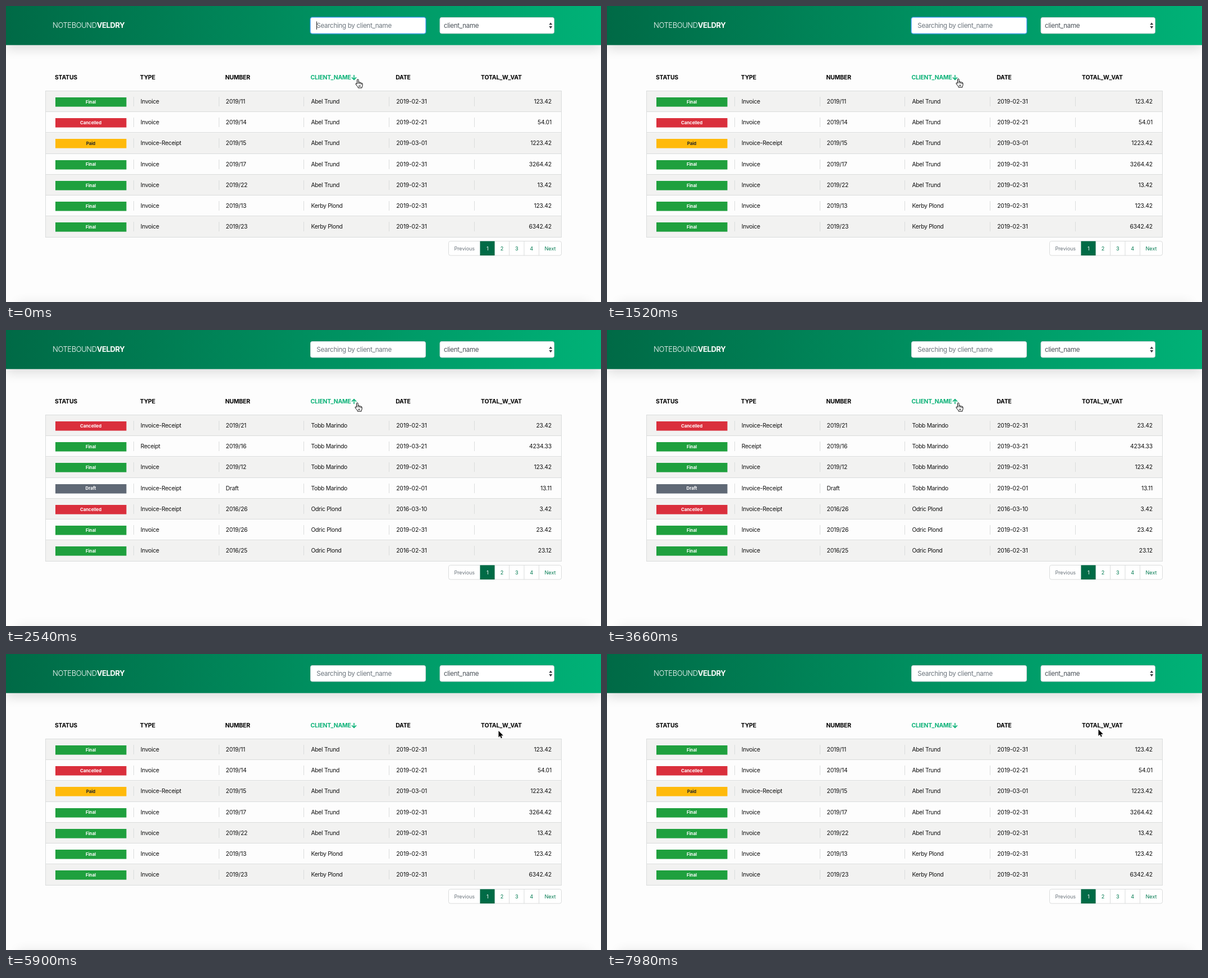
An HTML page for the animation above (8 s loop, 1060 px wide and 528 px high).

```html
<!DOCTYPE html>
<html lang="en">
<head>
<meta charset="utf-8">
<title>Document list</title>
<style>
  html, body { margin: 0; width: 100%; height: 100%; overflow: hidden; background: #fdfdfd; }
  svg { display: block; width: 1060px; height: 528px; }
  text { font: 10.4px Inter, "Open Sans", sans-serif; letter-spacing: -.3px; fill: #111; white-space: pre; }
  .logo { font-size: 13px; font-weight: 300; letter-spacing: -.4px; fill: #fff; }
  .logo tspan { font-weight: 700; }
  .field { font-size: 11.6px; fill: #495057; }
  .hint { fill: #6c757d; }
  .head { font-weight: 700; letter-spacing: -.15px; fill: #000; }
  .badge { font-size: 7.8px; font-weight: 700; letter-spacing: 0; text-anchor: middle; }
  .page { font-size: 9.1px; letter-spacing: -.05px; text-anchor: middle; }
  .num { letter-spacing: -.2px; }
  .end { text-anchor: end; }
</style>
</head>
<body>
<svg id="stage" viewBox="0 0 1060 528"></svg>
<script>
const LOOP = 8000, SORT_UP = 2500, SORT_DOWN = 3820;
const GREEN = '#006b46', ACCENT = '#0bb277', LINE = '#dadcdc';
const HEADS = ['STATUS', 'TYPE', 'NUMBER', 'CLIENT_NAME', 'DATE', 'TOTAL_W_VAT'];
const BADGES = {
  Final: ['#1fa03e', '#fff'], Cancelled: ['#da2f3c', '#fff'],
  Paid: ['#ffba0b', '#212529'], Draft: ['#5f6875', '#fff']
};
const DOWN = `Final|Invoice|2019/11|Abel Trund|2019-02-31|123.42
Cancelled|Invoice|2019/14|Abel Trund|2019-02-21|54.01
Paid|Invoice-Receipt|2019/15|Abel Trund|2019-03-01|1223.42
Final|Invoice|2019/17|Abel Trund|2019-02-31|3264.42
Final|Invoice|2019/22|Abel Trund|2019-02-31|13.42
Final|Invoice|2019/13|Kerby Plond|2019-02-31|123.42
Final|Invoice|2019/23|Kerby Plond|2019-02-31|6342.42`;
const UP = `Cancelled|Invoice-Receipt|2019/21|Tobb Marindo|2019-02-31|23.42
Final|Receipt|2019/16|Tobb Marindo|2019-03-21|4234.33
Final|Invoice|2019/12|Tobb Marindo|2019-02-31|123.42
Draft|Invoice-Receipt|Draft|Tobb Marindo|2019-02-01|13.11
Cancelled|Invoice-Receipt|2016/26|Odric Plond|2016-03-10|3.42
Final|Invoice|2019/26|Odric Plond|2019-02-31|23.42
Final|Invoice|2016/25|Odric Plond|2016-02-31|23.12`;

const text = (x, y, s, cls = '', fill = '') =>
  `<text x="${x}" y="${y}" class="${cls}"${fill && ` style="fill:${fill}"`}>${s}</text>`;
const rect = (x, y, w, h, fill, more = '') =>
  `<rect x="${x}" y="${y}" width="${w}" height="${h}" fill="${fill}" ${more}/>`;
const path = (d, more) => `<path d="${d}" ${more}/>`;
const rowTop = i => 152 + i * 37.22;
const colLeft = i => 87 + i * 151.8;

function grid() {
  let out = '';
  for (let i = 0; i < 7; i++) {
    const y = rowTop(i);
    if (i % 2 == 0) out += rect(71, y, 918, 37.2, '#f2f2f1');
    out += path(`M71 ${Math.round(y) - .5}H989`, `stroke="${LINE}"`);
    for (let c = 1; c < 6; c++)
      out += path(`M${Math.floor(colLeft(c) - 11.6) + .5} ${Math.round(y) + 10}v17`, `stroke="${LINE}"`);
  }
  return out + rect(70.5, 151.5, 919, 261, 'none', `stroke="${LINE}"`);
}

function rows(data) {
  return data.split('\n').map((line, i) => {
    const [status, ...cells] = line.split('|'), y = rowTop(i), [bg, ink] = BADGES[status];
    return rect(88, Math.round(y + 11), 126.5, 16.6, bg) +
      text(151, y + 21.8, status, 'badge', ink) +
      cells.map((s, c) => {
        const cls = /\d/.test(s) ? 'num' : '';
        return c == 4 ? text(972, y + 22, s, 'end ' + cls)
                      : text(colLeft(c + 1) + 1, y + 22, s, cls);
      }).join('');
  }).join('');
}

function pager() {
  const edges = [788.5, 845, 870.5, 896.5, 923, 949.5, 989.5];
  const labels = ['Previous', 1, 2, 3, 4, 'Next'];
  const inks = ['#6c757d', '#fff'];
  return rect(788.5, 419.5, 201, 25.5, '#fff', `rx="3.3" stroke="${LINE}"`) +
    edges.slice(1, 6).map(x => path(`M${x} 420v25`, `stroke="${LINE}"`)).join('') +
    rect(844.5, 419.5, 26, 25.5, GREEN) +
    labels.map((s, i) =>
      text((edges[i] + edges[i + 1]) / 2, 436.3, s, 'page', inks[i] || '#007a50')).join('');
}

const sortArrow = (d, id) =>
  path(d, `id="${id}" fill="none" stroke="${ACCENT}" stroke-width="1.6"`);

const stage = document.getElementById('stage');
stage.innerHTML = `
  <defs>
    <linearGradient id="bar"><stop stop-color="#006a46"/><stop offset="1" stop-color="#00b277"/></linearGradient>
    <filter id="soft" x="-10%" y="-100%" width="120%" height="300%"><feGaussianBlur stdDeviation="10"/></filter>
  </defs>` +
  rect(0, 0, 1060, 528, '#fdfdfd') +
  rect(0, 8, 1060, 69, '#000', 'opacity=".12" filter="url(#soft)"') +
  rect(20, 528, 1020, 60, '#000', 'opacity=".08" filter="url(#soft)"') +
  rect(0, 0, 1060, 69.7, 'url(#bar)') +
  text(83, 38.6, 'NOTEBOUND<tspan>VELDRY</tspan>', 'logo') +
  rect(542, 20, 206, 29.5, 'none', 'id="ring" rx="4" stroke="#2b8fe0" stroke-width="2" opacity=".6"') +
  rect(542.5, 20.5, 205, 28.5, '#fff', 'id="search" rx="3"') +
  text(553.3, 39, 'Searching by client_name', 'field hint') +
  rect(553, 27.5, 1, 14.5, '#222', 'id="caret"') +
  rect(773, 20.5, 203.5, 28.5, '#fff', 'rx="3" stroke="#ced4da"') +
  text(780, 39, 'client_name', 'field') +
  path('M967.3 33.6l3-4.2 3 4.2zM967.3 36l3 4.2 3-4.2z', 'fill="#343a40"') +
  HEADS.map((s, i) => text(colLeft(i), 131, s, 'head', i == 3 ? ACCENT : '')).join('') +
  sortArrow('M620 123V131.3M616 127.4l4 4 4-4', 'arrowDown') +
  sortArrow('M620 132V123.7M616 127.6l4-4 4 4', 'arrowUp') +
  grid() + `<g id="down">${rows(DOWN)}</g><g id="up">${rows(UP)}</g>` + pager() +
  `<g id="cursor" stroke-linejoin="round">` +
  path('M-1.5 8V1.2a1.3 1.3 0 0 1 2.6 0V5q2.4-.8 2.6.8 2.2-.6 2.4.8 2-.3 2 1.4v2.6q0 1.4-1 3V15H.2v-1.2Q-1.8 11.4-3.6 9q-1-2 .4-2 1 .2 1.7 1zM1.1 5v3M3.7 6v2.4M6.1 7v2M2 10.5v2.5M4 10.5v2.5',
    'id="hand" fill="#fff" stroke="#000"') +
  path('M0 0V11.6L2.7 9.1 4.4 13.2 6.3 12.4 4.6 8.4H8.3Z',
    'id="pointer" fill="#000" stroke="#fff" stroke-width="1.2" paint-order="stroke"') + '</g>';

const LINKS = [[542, 628], [694, 722], [846, 917]];

const ease = (t, from, to) => {
  const k = Math.min(1, Math.max(0, (t - from) / (to - from)));
  return k * k * (3 - 2 * k);
};

// Settle on the sorted column, sweep right in a shallow arc, then drift a little.
function pointerAt(t) {
  const settle = ease(t, 0, 200), sweep = ease(t, 4170, 5220), drift = ease(t, 6700, 7300);
  return [
    627 - settle + 251.5 * sweep - 2 * drift,
    131 - settle + 7 * sweep - 8 * Math.sin(Math.PI * sweep) - 2.5 * drift
  ];
}

const el = id => document.getElementById(id);
const show = (id, on) => el(id).style.display = on ? '' : 'none';

function draw(t) {
  const up = t >= SORT_UP && t < SORT_DOWN, focused = t < SORT_UP;
  show('up', up); show('arrowUp', up);
  show('down', !up); show('arrowDown', !up);
  show('ring', focused);
  el('search').setAttribute('stroke', focused ? '#80bdff' : '#ced4da');
  show('caret', focused && (t + 140) % 1000 < 500);
  const [x, y] = pointerAt(t);
  const onLink = y < 134 && LINKS.some(([a, b]) => x >= a && x <= b);
  show('hand', onLink); show('pointer', !onLink);
  el('cursor').setAttribute('transform', `translate(${x} ${y})`);
}

const start = performance.now();
function tick() {
  draw((performance.now() - start) % LOOP);
  requestAnimationFrame(tick);
}
tick();
</script>
</body>
</html>
```
